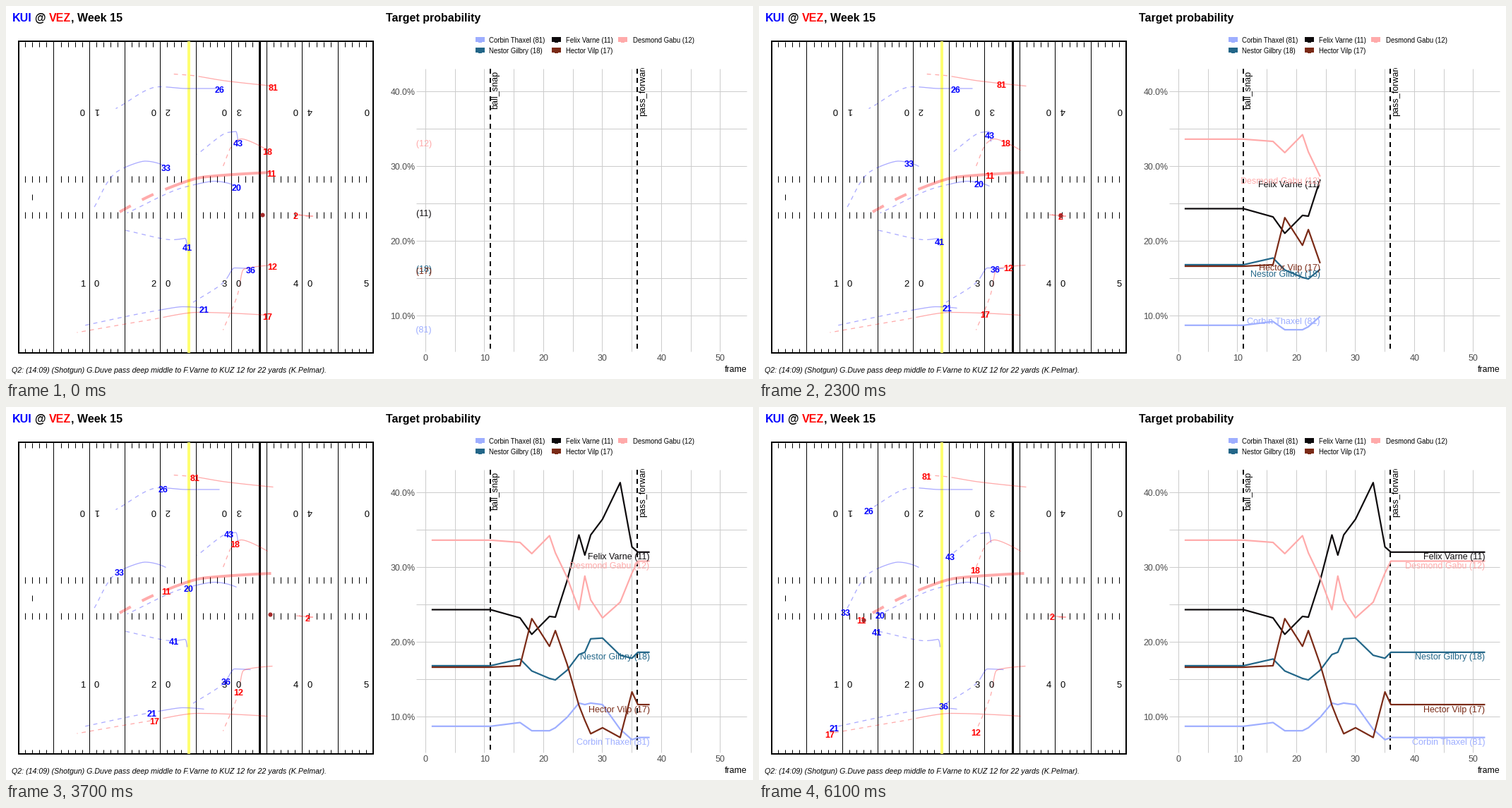
A matplotlib script for the animation above (6200 ms loop, 1058 by 529 pixels).

```python
import numpy as np
import matplotlib.pyplot as plt
from matplotlib.animation import FuncAnimation
from matplotlib.patches import Rectangle
from matplotlib.transforms import Bbox, TransformedBbox

W, H, DPI = 1058, 529, 64
PT = 72 / DPI  # points per pixel
TICKS, LAST = 62, 52
SNAP, HANDLED, PASS, CATCH = 11, 19, 36, 49

plt.rcParams["font.family"] = "Liberation Sans"
fig = plt.figure(figsize=(W / DPI, H / DPI), dpi=DPI, facecolor="white")
ax = fig.add_axes([0, 0, 1, 1])
# Whole numbers are pixel centres; 0.49 keeps snapped strokes on their pixel.
ax.set(xlim=(-0.49, W - 0.49), ylim=(H - 0.51, -0.51))
ax.axis("off")


def line(xs, ys, color="black", width=1.0, **kw):
    kw = {"solid_capstyle": "butt", "dash_capstyle": "butt", **kw}
    return ax.plot(xs, ys, color=color, lw=width * PT, **kw)[0]


def vlines(xs, y0, y1, color="black", width=1.0, **kw):
    for x in np.round(xs):
        line([x, x], [y0, y1], color, width, **kw)


def label(x, y, s, size, color="black", **kw):
    """Text whose capitals are centred on y."""
    return ax.text(x, y + 0.36 * size, s, fontsize=size * PT, color=color,
                   va="baseline", **kw)


def smooth(keys, vals, t):
    """Monotone cubic that starts from rest."""
    keys, vals = np.asarray(keys, float), np.asarray(vals, float)
    h = np.diff(keys)
    d = np.diff(vals) / h
    same = d[:-1] * d[1:] > 0
    a, b = np.where(same, d[:-1], 1), np.where(same, d[1:], 1)
    w1, w2 = 2 * h[1:] + h[:-1], h[1:] + 2 * h[:-1]
    inner = np.where(same, (w1 + w2) / (w1 / a + w2 / b), 0)
    m = np.concatenate([[0], inner, [d[-1]]])
    t = np.maximum(t, keys[0])
    k = np.clip(np.searchsorted(keys, t, side="right") - 1, 0, len(h) - 1)
    s = (t - keys[k]) / h[k]
    return ((1 + 2 * s) * (1 - s) ** 2 * vals[k] + s * (1 - s) ** 2 * h[k] * m[k]
            + s * s * (3 - 2 * s) * vals[k + 1] + s * s * (s - 1) * h[k] * m[k + 1])


# ---- Field ----
LEFT, TOP, RIGHT, BOTTOM = 17.2, 49, 520, 491
YARD = (RIGHT - LEFT) / 50


def yard_x(yards):
    return LEFT + YARD * np.asarray(yards)


vlines(yard_x(range(5, 50, 5)), TOP, BOTTOM)
small = yard_x([y for y in range(50) if y % 5])
for y0, y1 in ((50, 57), (240, 249), (291, 300), (485, 491)):
    vlines(small, y0, y1)
vlines(yard_x([2]), 266, 274)

for tens in range(1, 6):
    for yard, bottom, top in ((10 * tens - 1, str(tens), "0"),
                              (10 * tens + 1, "0", str(tens))):
        if yard < 50:
            x = yard_x(yard)
            label(x, 393, bottom, 13, ha="center")
            ax.text(x, 147, top, fontsize=13 * PT, rotation=180,
                    ha="center", va="center")

ax.add_patch(Rectangle((17.5, TOP + 0.5), RIGHT - 17.5, BOTTOM - TOP, fill=False,
                       lw=2 * PT, ec="black"))
vlines([259], TOP, BOTTOM, "#ffff70", 4)
vlines([359], TOP, BOTTOM, "black", 3)

# ---- Players: four points each, passed at these times ----
MARKS = [12, 31, 39, LAST]
offense = {
    "81": [(378, 113), (309, 105.5), (263, 98), (237, 96)],
    "18": [(370, 204), (333, 188), (322, 194), (306, 229)],
    "11": [(375, 235.5), (280, 242), (219, 262), (144.5, 300)],
    "2": [(410, 295.5), (434, 297.5), (426, 297.5), (414.5, 295.5)],
    "12": [(377, 367), (336, 373), (328, 407), (307, 459)],
    "17": [(370, 438), (270, 434), (201, 445), (100, 462.5)],
}
defense = {
    "26": [(302, 116.5), (254, 116.5), (217, 114), (155, 145)],
    "43": [(328, 192), (325, 177.5), (313, 179), (270, 210)],
    "33": [(226, 227), (196, 219.5), (156, 235), (122, 289)],
    "20": [(326, 255), (294, 248), (252, 256.5), (171, 293)],
    "41": [(256, 340), (253, 329), (234, 331), (166, 317)],
    "36": [(346, 372), (323, 371), (309, 390), (261, 422)],
    "21": [(280, 428), (249, 426), (199, 434), (106, 453.5)],
}

times = np.arange(1, LAST + 1)
tags, paths = {}, {}
for team, color in ((defense, "blue"), (offense, "red")):
    for number, points in team.items():
        px, py = (smooth(MARKS, axis, times) for axis in zip(*points))
        width = 4 if number == "11" else 1.3
        line(px[:PASS], py[:PASS], color, width, alpha=0.33)
        line(px[PASS - 1:], py[PASS - 1:], color, width, alpha=0.33,
             linestyle=(0, (4.5, 4.5)))
        tags[number] = label(0, 0, number, 12.5, color, weight="bold",
                             ha="center", zorder=5)
        paths[number] = np.column_stack([px, py])


def ball_at(n):
    """Snapped to the passer, thrown to the receiver, then carried."""
    rest = np.array([362.5, 295])
    passer = paths["2"][n - 1]
    if n < HANDLED:
        return rest + (passer - rest) * max(0, n - SNAP) / (HANDLED - SNAP)
    if n < PASS:
        return passer
    release, caught = paths["2"][PASS - 2], paths["11"][CATCH - 1]
    if n < CATCH:
        s = (n - PASS + 1) / (CATCH - PASS + 1)
        arc = np.array([0, -16 * s * (1 - s)])
        return release + (caught - release) * s + arc
    return paths["11"][n - 1] + (3.5, 1)


ball, = ax.plot([], [], "o", color="brown", ms=6.2 * PT, mew=0, zorder=6)

# ---- Titles ----
for x, s, color in ((8, "KUI", "blue"), (40, "@", "black"), (60, "VEZ", "red"),
                    (91.5, ", Week 15", "black"), (538, "Target probability", "black")):
    label(x, 15.5, s, 16, color, weight="bold")
label(8, 516, "Q2: (14:09) (Shotgun) G.Duve pass deep middle to F.Varne to KUZ 12 "
      "for 22 yards (K.Pelmar).", 10.67, style="italic")

# ---- Chart ----
X0, X1, Y0, Y1 = 581, 1049, 88, 489
panel = TransformedBbox(
    Bbox.from_extents(X0 / W, 1 - (Y1 + 1) / H, X1 / W, 1 - Y0 / H), fig.transFigure)


def chart_x(n):
    return 594 + 8.345 * np.asarray(n)


def chart_y(pct):
    return 120.5 + 10.6 * (40 - np.asarray(pct))


vlines(chart_x(range(0, 55, 5)), Y0, Y1, "#cccccc")
for pct in range(10, 45, 5):
    line([X0, X1], [np.floor(chart_y(pct))] * 2, "#cccccc")
for pct in range(10, 50, 10):
    label(579, chart_y(pct) + 0.5, f"{pct}.0%", 12.4, "#4d4d4d", ha="right")
for n in range(0, 60, 10):
    label(chart_x(n), 498, str(n), 12.5, "#4d4d4d", ha="center")
label(1049, 514, "frame", 12.2, ha="right")

for n, event in ((SNAP, "ball_snap"), (PASS, "pass_forward")):
    x = chart_x(n)
    vlines([x], Y0, Y1, width=2, linestyle=(0, (3.5, 3)), zorder=3)
    note = ax.text(x + 7, 118, event, fontsize=12.5 * PT, rotation=90,
                   ha="center", va="center", clip_on=True, zorder=3)
    note.set_clip_box(panel)

# Turning points shared by all curves; flat before the first and after the last.
TURNS = [11, 16, 18, 21, 22, 24, 26, 27, 28, 30, 33, 35, 36]
SERIES = [
    ("Corbin Thaxel (81)", "#9eaeff",
     [8.7, 9.2, 8.1, 8.1, 8.5, 9.9, 11.8, 11.6, 11.8, 11.6, 8.3, 6.9, 7.2]),
    ("Nestor Gilbry (18)", "#226688",
     [16.8, 17.7, 16.1, 15.1, 14.9, 16.2, 18.3, 18.6, 20.4, 20.5, 18.2, 17.8, 18.6]),
    ("Felix Varne (11)", "#0d0a0c",
     [24.3, 23.2, 21, 23.4, 23.3, 28.2, 34.3, 31.6, 34.3, 36.4, 41.3, 32.7, 32]),
    ("Hector Vilp (17)", "#7a2a16",
     [16.6, 16.8, 23.1, 19.4, 21.5, 17, 11.5, 9.5, 7.7, 8.5, 7.2, 13.3, 11.6]),
    ("Desmond Gabu (12)", "#ffaaaa",
     [33.6, 33.3, 31.8, 34.2, 31.9, 28.6, 24.3, 28.8, 25.6, 23.2, 25.3, 29.2, 30.8]),
]
KEY_X, TEXT_X = (665, 773, 867), (684, 793, 888)

curves = []
for i, (name, color, values) in enumerate(SERIES):
    col, y = i // 2, 47 + 15 * (i % 2)
    ax.add_patch(Rectangle((KEY_X[col], y - 4), 12.5, 7.5, color=color, lw=0))
    ax.add_patch(Rectangle((KEY_X[col] + 4, y + 3), 4.5, 1.6, color=color, lw=0))
    label(TEXT_X[col], y + 1.5, name, 9.6)

    ys = chart_y(np.interp(times, TURNS, values))
    curve = line([], [], color, 2.2, zorder=4, solid_joinstyle="round", snap=False)
    tag = ax.text(0, 0, name, fontsize=12.5 * PT, color=color, ha="right",
                  va="baseline", clip_on=True, zorder=5)
    tag.set_clip_box(panel)
    curves.append((curve, tag, ys))

curve_x = chart_x(times)


def draw(tick):
    n = min(tick + 1, LAST)
    for number, tag in tags.items():
        x, y = paths[number][n - 1]
        tag.set_position((x, y + 1.5 + 0.36 * 12.5))
    bx, by = ball_at(n)
    ball.set_data([bx], [by])
    for curve, tag, ys in curves:
        shown = n if n > 1 else 0
        curve.set_data(curve_x[:shown], ys[:shown])
        tag.set_position((curve_x[n - 1], ys[n - 1] + 10.5))
    return []


anim = FuncAnimation(fig, draw, frames=TICKS, interval=100, repeat=True,
                     repeat_delay=0, init_func=lambda: draw(0))
plt.show()
```
